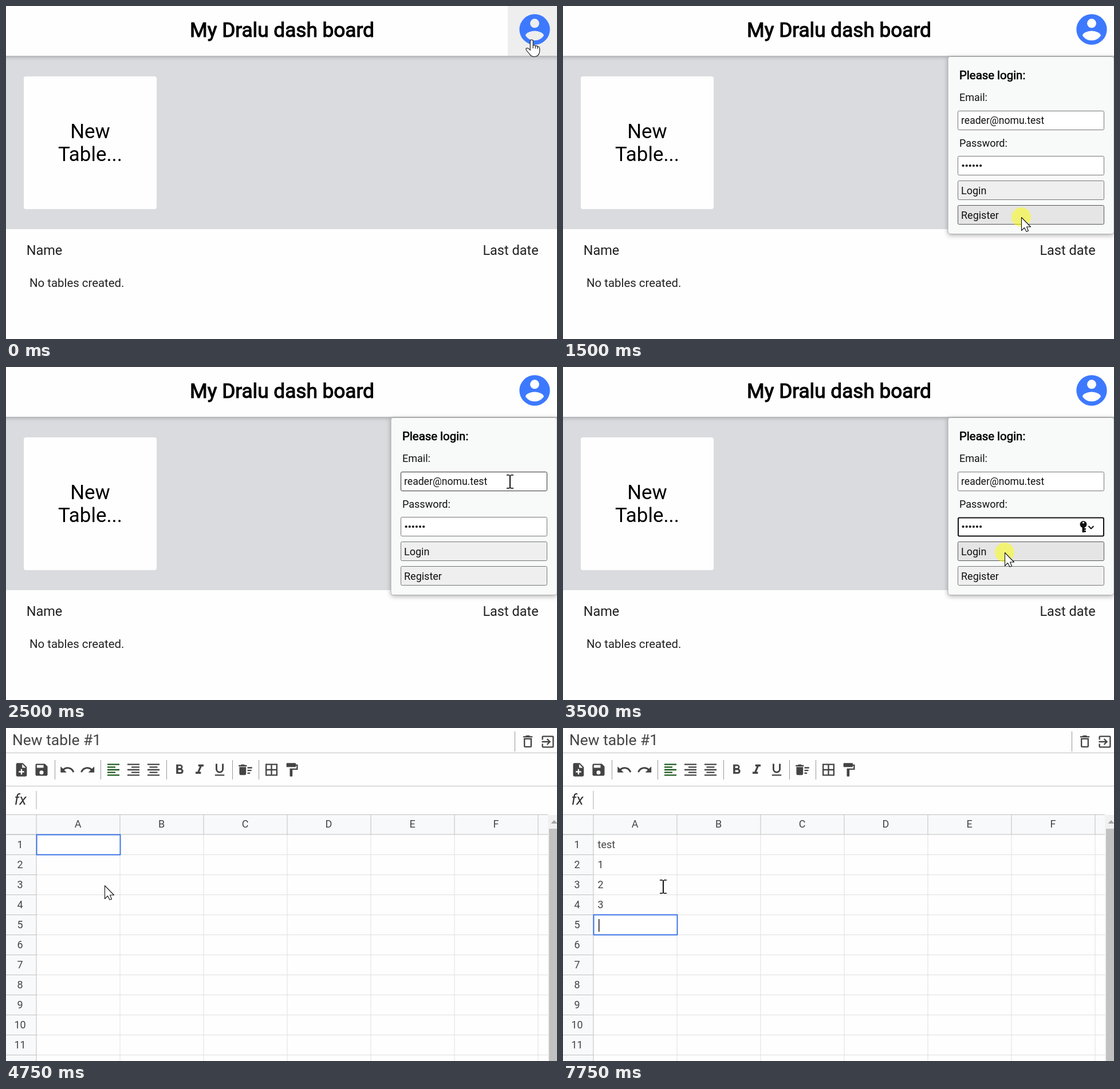
Recreate the animation shown at these times as an HTML page with a canvas. Size 962 px wide and 582 px high, loop 8000 ms.

```html
<!DOCTYPE html>
<html lang="en">
<head>
<meta charset="utf-8">
<title>Table dashboard</title>
<style>
html, body { margin: 0; width: 100%; height: 100%; overflow: hidden; background: #fff; }
canvas { display: block; width: 962px; height: 582px; }
</style>
</head>
<body>
<canvas id="stage" width="962" height="582"></canvas>
<script>
const ctx = document.getElementById('stage').getContext('2d');
const W = 962, H = 582, LOOP = 8000;
const EMAIL = 'reader@nomu.test';
const INK = '#444', LINE = '#c0c0c0';

// Pointer states: start time, kind, x, y, click highlight.
const POINTER = [
  [0, 'hand', 917, 58, false],
  [500, 'beam', 878, 200, true],
  [1000, 'beam', 878, 279, true],
  [1500, 'arrow', 800, 369, true],
  [2000, 'hand', 928, 38, true],
  [2500, 'beam', 878, 200, false],
  [3000, 'beam', 860, 293, true],
  [3500, 'arrow', 771, 324, true],
  [3750, 'arrow', 367, 414, true],
  [4250, 'hand', 172, 275, true],
  [4750, 'arrow', 172, 275, false],
  [7500, 'beam', 173, 277, false]
];

// Sheet input: time, selected row, text of that row.
const TYPING = [
  [4750, 0, ''], [5250, 0, 't'], [5500, 0, 'te'], [5750, 0, 'tes'], [6000, 0, 'test'],
  [6250, 1, ''], [6500, 1, '1'], [6750, 2, ''], [7000, 2, '2'],
  [7250, 3, ''], [7500, 3, '3'], [7750, 4, '']
];
const DONE = ['test', '1', '2', '3'];

const current = (steps, t) => steps.filter(s => s[0] <= t).pop();
const between = (t, a, b) => t >= a && t < b;

function rect(x, y, w, h, color) {
  ctx.fillStyle = color;
  ctx.fillRect(x, y, w, h);
}

function box(x, y, w, h, r, fill, stroke, line = 1) {
  ctx.beginPath();
  ctx.roundRect(x, y, w, h, r);
  if (fill) { ctx.fillStyle = fill; ctx.fill(); }
  if (stroke) { ctx.strokeStyle = stroke; ctx.lineWidth = line; ctx.stroke(); }
}

function disc(x, y, r, color) {
  ctx.beginPath();
  ctx.arc(x, y, r, 0, Math.PI * 2);
  ctx.fillStyle = color;
  ctx.fill();
}

function text(s, x, y, size, color, { align = 'left', style = '', heavy = false } = {}) {
  ctx.font = `${style} ${size}px Roboto, sans-serif`;
  ctx.textAlign = align;
  ctx.fillStyle = color;
  ctx.fillText(s, x, y);
  if (heavy) {
    ctx.strokeStyle = color;
    ctx.lineWidth = size / 31;
    ctx.lineJoin = 'round';
    ctx.strokeText(s, x, y);
  }
}

function withShadow(color, blur, dy, draw) {
  ctx.save();
  ctx.shadowColor = color;
  ctx.shadowBlur = blur;
  ctx.shadowOffsetY = dy;
  draw();
  ctx.restore();
}

// Draws a 24-unit icon centred on (x, y).
function icon(x, y, path, color = INK, scale = 1.17) {
  ctx.save();
  ctx.translate(x - 12 * scale, y - 12 * scale);
  ctx.scale(scale, scale);
  ctx.fillStyle = color;
  ctx.fill(new Path2D(path), 'evenodd');
  ctx.restore();
}

function outline(path, x, y, fill) {
  ctx.save();
  ctx.translate(x, y);
  const p = new Path2D(path);
  ctx.lineWidth = 1.1;
  ctx.lineJoin = 'round';
  ctx.strokeStyle = '#111';
  if (fill) { ctx.fillStyle = fill; ctx.fill(p); }
  ctx.stroke(p);
  ctx.restore();
}

function drawPointer([, kind, x, y, click]) {
  if (click) disc(x, y, 17, 'rgba(255,255,0,.5)');
  if (kind === 'arrow') {
    outline('M.5 .5V23.5L5.5 18.5L9 25.3L12.5 24L9.6 17H16.5Z', x, y, '#fff');
  } else if (kind === 'hand') {
    outline('M-2.5 18V2Q-2.5 -.5 0 -.5T2.5 2V9.5Q5.5 7.5 6.5 10.5Q9.5 9 10.3 12Q13.5 10.5 14 14.5V20Q13 29 4 29Q-1 29-4 24L-9 18Q-11 14.5-8 14Q-5 14-2.5 18Z', x + .7, y + 1.5, '#fff');
    outline('M2.5 9.5V14.5M6.5 10.5V15M10.3 12V15.5', x + .7, y + 1.5);
  } else {
    rect(x + 1, y - 11, 2, 23, '#111');
    for (const dy of [-12, 11]) {
      rect(x - 4, y + dy, 5, 1.6, '#111');
      rect(x + 3, y + dy, 5, 1.6, '#111');
    }
  }
}

function drawAvatar() {
  icon(923, 41, 'M12 2A10 10 0 1 0 12 22A10 10 0 1 0 12 2ZM12 5A3 3 0 1 1 12 11A3 3 0 1 1 12 5ZM12 19.2C9.5 19.2 7.3 17.9 6 16C6 14 10 12.9 12 12.9S18 14 18 16C16.7 17.9 14.5 19.2 12 19.2Z', '#3d79ff', 2.667);
}

function drawKey() {
  disc(908.5, 275, 6, '#111');
  disc(908.5, 272, 1.6, '#fff');
  rect(906.5, 279, 4, 10, '#111');
  rect(910, 282, 3, 2.5, '#111');
  rect(910, 286, 3, 2.5, '#111');
  ctx.beginPath();
  ctx.moveTo(917.5, 278);
  ctx.lineTo(922, 282.5);
  ctx.lineTo(926.5, 278);
  ctx.strokeStyle = '#111';
  ctx.lineWidth = 2;
  ctx.stroke();
}

function drawLogin(t, [, , , py]) {
  const over = y => py >= y && py < y + 34;
  const field = y => box(689.5, y + .5, 255, 33, 2, '#fff', over(y) ? '#333' : '#767676');
  const button = (label, y) => {
    box(689.5, y + .5, 255, 33, 2, over(y) ? '#e5e5e5' : '#efefef', over(y) ? '#555' : '#767676');
    text(label, 695, y + 23.5, 18, '#111');
  };
  const focused = t >= 3000;

  withShadow('rgba(0,0,0,.3)', 8, 2, () => box(672, 88, 290, 311, 4, '#f8faf9'));
  box(672, 88.5, 290, 310, 4, null, '#aaa');
  text('Please login:', 692, 128, 20.4, '#000', { heavy: true });
  text('Email:', 692, 166, 18, '#111');
  text('Password:', 692, 246, 18, '#111');
  field(183);
  text(EMAIL, 695, 206, 17.6, '#111');
  if (focused) box(690, 263.5, 254, 32, 2, '#fff', '#111', 2);
  else field(262);
  for (let i = 0; i < 6; i++) disc(698.6 + i * 6.1, 279, 2.1, '#111');
  if (focused) drawKey();
  if (between(t, 3250, 3500)) rect(732, 270, 1, 20, '#111');
  button('Login', 305);
  button('Register', 348);
}

function drawDashboard(t, pointer) {
  const hover = t >= 4250;
  const onAvatar = t < 500 || between(t, 2000, 2500);
  const cardInk = hover ? '#008000' : '#000';

  rect(0, 0, W, H, '#fefefe');
  rect(0, 87, W, 303, '#dadbdf');
  withShadow('rgba(0,0,0,.25)', 7, 2, () => rect(-10, 0, W + 20, 87, '#fefefe'));
  if (onAvatar) rect(876, 0, 86, 87, '#eee');
  text('My Dralu dash board', 482, 54, 35.2, '#000', { align: 'center', heavy: true });
  drawAvatar();
  if (t >= 3750) text(EMAIL, 869, 50, 24, '#2fa21d', { align: 'right', style: 'italic' });

  if (hover) box(30.7, 122.7, 232.6, 232.6, 4, '#fefefe', '#008000', 1.4);
  else box(31, 123, 232, 232, 4, '#fefefe');
  text('New', 147, 231, 34.9, cardInk, { align: 'center' });
  text('Table...', 147, 271, 34.9, cardInk, { align: 'center' });

  text('Name', 35.7, 435, 23.5, '#222');
  text('Last date', 929.7, 435, 23.5, '#222', { align: 'right' });
  text('No tables created.', 41, 490.5, 20.4, '#222');

  if (between(t, 500, 2000) || between(t, 2500, 3750)) drawLogin(t, pointer);
}

function drawToolbar() {
  text('New table #1', 11, 30, 26.4, INK);
  rect(0, 43, W, 1, LINE);
  rect(0, 101, W, 1, LINE);
  rect(888, 6, 1, 35, '#999');
  for (const x of [85, 165, 280, 395, 441]) rect(x, 56, 1, 34, '#999');

  icon(911, 23.5, 'M6 7H18V19Q18 21 16 21H8Q6 21 6 19ZM8 9V19H16V9ZM5 4H8.5L9.5 3H14.5L15.5 4H19V6H5Z');
  icon(946, 24, 'M10.1 15.6L11.5 17L16.5 12L11.5 7L10.1 8.4L12.7 11H3V13H12.7ZM5 3H19Q21 3 21 5V19Q21 21 19 21H5Q3 21 3 19V15H5V19H19V5H5V9H3V5Q3 3 5 3Z');
  icon(27, 73, 'M6 2H14L20 8V20Q20 22 18 22H6Q4 22 4 20V4Q4 2 6 2ZM13 3.5V9H18.5ZM11 11H13V14H16V16H13V19H11V16H8V14H11Z');
  icon(62, 73, 'M5 3H17L21 7V19Q21 21 19 21H5Q3 21 3 19V5Q3 3 5 3ZM5 5V9H15V5ZM12 13A3 3 0 1 0 12 19A3 3 0 1 0 12 13Z');

  const undo = 'M12.5 8C9.8 8 7.4 9 5.6 10.6L2 7V16H11L7.4 12.4C8.8 11.2 10.5 10.5 12.5 10.5C16 10.5 19 12.8 20.1 16L22.5 15.2C21.1 11 17.1 8 12.5 8Z';
  icon(107, 73, undo);
  ctx.save();
  ctx.translate(285, 0);
  ctx.scale(-1, 1);
  icon(142.5, 73, undo);
  ctx.restore();

  const align = (x, start, color) => {
    let path = '';
    for (let i = 0; i < 5; i++) {
      path += i % 2 ? `M${start} ${3 + i * 4}h12v2h-12Z` : `M3 ${3 + i * 4}h18v2h-18Z`;
    }
    icon(x, 73, path, color);
  };
  align(187.5, 3, '#1c5a1c');
  align(222.5, 9);
  align(257.5, 6);

  icon(303, 73, 'M7 4H13.3A4 4 0 0 1 15.6 10.8A3.8 3.8 0 0 1 14 18H7ZM10 6.5V9.5H13A1.5 1.5 0 0 0 13 6.5ZM10 12.5V15.5H13.5A1.5 1.5 0 0 0 13.5 12.5Z');
  icon(338, 73, 'M10 4V7H12.2L8.8 15H6V18H14V15H11.8L15.2 7H18V4Z');
  icon(373, 73, 'M6 3H8.5V11A3.5 3.5 0 0 0 15.5 11V3H18V11A6 6 0 0 1 6 11ZM5 19H19V21H5Z');
  icon(418, 73, 'M15 16h4v2h-4ZM15 8h7v2h-7ZM15 12h6v2h-6ZM3 8H13V18Q13 20 11 20H5Q3 20 3 18ZM2 5H5L6 4H10L11 5H14V7H2Z');
  icon(463.5, 73, 'M3 3H21V21H3ZM5 5V11H11V5ZM13 5V11H19V5ZM5 13V19H11V13ZM13 13V19H19V13Z');
  icon(499, 73, 'M5 2H17Q18 2 18 3V4H21V12H13V21Q13 22 12 22H10Q9 22 9 21V10H19V6H18V7Q18 8 17 8H5Q4 8 4 7V3Q4 2 5 2Z');
}

function drawGrid() {
  rect(0, 151, 946, 35, '#f8f9fa');
  rect(0, 186, 53, H - 186, '#f8f9fa');
  for (let i = 0; i < 12; i++) {
    const y = 186 + i * 35;
    rect(53, y + 35, 893, 1, '#e0e0e0');
    rect(0, y, 53, 1, LINE);
    text(i + 1, 24.5, y + 23.5, 18, INK, { align: 'center' });
  }
  for (let i = 0; i < 7; i++) {
    const x = 53 + i * 146;
    rect(x - .5, 186, 1, H - 186, i ? '#e0e0e0' : LINE);
    rect(x - .5, 151, 1, 35, LINE);
    if (i < 6) text('ABCDEF'[i], x + 72.5, 174, 18, INK, { align: 'center' });
  }
  rect(0, 151, 946, 1, LINE);
  rect(0, 185.5, 946, 1, LINE);

  rect(946, 152, 16, H - 152, '#f1f1f1');
  rect(948, 176, 14, H - 176, '#c1c1c1');
  ctx.beginPath();
  ctx.moveTo(951.5, 167);
  ctx.lineTo(957, 161);
  ctx.lineTo(962.5, 167);
  ctx.fillStyle = '#a3a3a3';
  ctx.fill();
}

function drawSheet(t) {
  const [start, row, value] = current(TYPING, t);
  rect(0, 0, W, H, '#fefefe');
  drawToolbar();
  text('fx', 14.5, 134, 26, '#333', { style: 'italic' });
  rect(52.5, 110, 1, 32, '#aaa');
  drawGrid();

  const cellText = (s, r) => text(s, 60.5, 210 + r * 35, 18, INK);
  DONE.slice(0, row).forEach(cellText);
  const top = 186 + row * 35;
  box(53.5, top + .5, 146, 35, 0, '#fff', '#3c74e6', 2);
  cellText(value, row);
  text(value, 60.5, 132, 18, INK);
  if (start > 4750) {
    const x = value ? 60 + Math.round(ctx.measureText(value).width) : 62;
    rect(x, top + 8, 1.6, 22, '#222');
  }
}

function frame(now) {
  const t = now % LOOP;
  const pointer = current(POINTER, t);
  if (t < 4750) drawDashboard(t, pointer);
  else drawSheet(t);
  drawPointer(pointer);
}

const origin = performance.now();
function tick() {
  frame(performance.now() - origin);
  requestAnimationFrame(tick);
}
tick();
</script>
</body>
</html>
```
